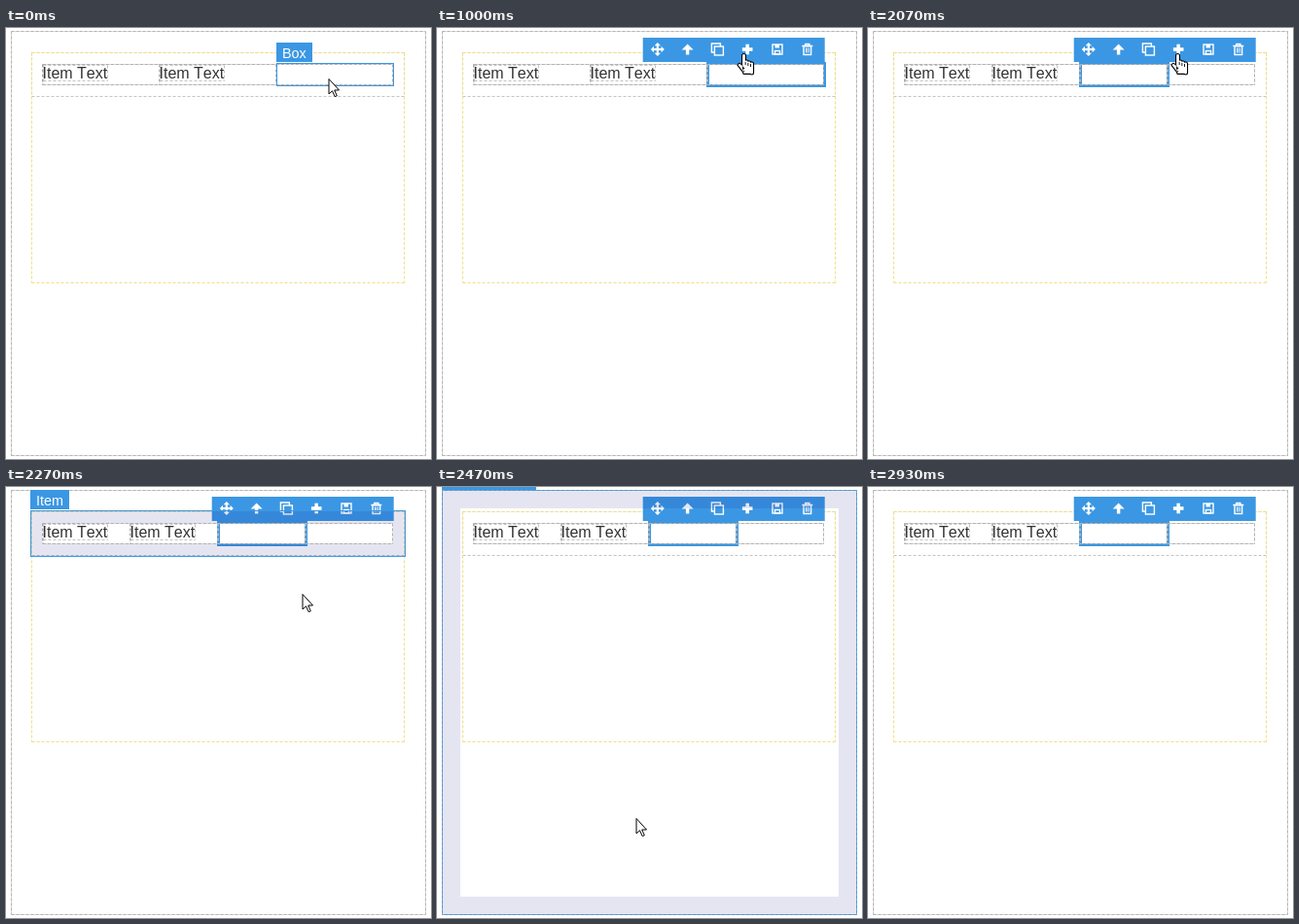
Animation of 437x444 px, one loop 3740 ms. Source, as an HTML page with a canvas:

```html
<!DOCTYPE html>
<html lang="en">
<head>
<meta charset="utf-8">
<title>Adding a box</title>
<style>
html, body { margin: 0; width: 100%; height: 100%; overflow: hidden; background: #fff; }
canvas { display: block; }
</style>
</head>
<body>
<canvas id="stage" width="437" height="444"></canvas>
<script>
const ctx = document.getElementById('stage').getContext('2d');
const LOOP = 3740;
const STEP = 1000 / 15;
const LEAVE = 2930;
const BLUE = '#3b97e3';
const FONT = '"Liberation Sans", Arial, sans-serif';

const linear = u => u;
const easeIn = u => u * u;
const easeOut = u => 1 - (1 - u) ** 2;

const path = [
  { t: 533, x: 332, y: 52 },
  { t: 600, x: 332, y: 44 },
  { t: 1000, x: 315, y: 26 },
  { t: 1130, x: 315, y: 24 },
  { t: 1200, x: 319, y: 20 },
  { t: 2000, x: 319, y: 20 },
  { t: 2267, x: 305, y: 110, ease: easeIn },
  { t: 2467, x: 205, y: 341 },
  { t: LEAVE, x: 128, y: 444, ease: easeOut }
];

function pointerAt(time) {
  const t = Math.floor((time + 4) / STEP) * STEP;
  const i = path.findIndex(p => p.t > t);
  if (i === 0) return path[0];
  const a = path[i - 1] || path.at(-1), b = path[i] || a;
  const u = (b.ease || linear)((t - a.t) / (b.t - a.t || 1));
  return { x: Math.round(a.x + (b.x - a.x) * u), y: Math.round(a.y + (b.y - a.y) * u) };
}

function rect(color, x, y, w, h) {
  ctx.fillStyle = color;
  ctx.fillRect(x, y, w, h);
}

function outline(color, x, y, w, h, width = 1) {
  ctx.strokeStyle = color;
  ctx.lineWidth = width;
  ctx.strokeRect(x + 0.5, y + 0.5, w, h);
}

function trace(...points) {
  ctx.beginPath();
  for (const [x, y] of points) ctx.lineTo(x, y);
}

function dashes(color, x, y, w, h) {
  const l = x + 0.5, t = y + 0.5, r = l + w, b = t + h;
  ctx.strokeStyle = color;
  ctx.lineWidth = 1;
  ctx.setLineDash([3, 2]);
  for (const side of [[[l, t], [r, t]], [[l, b], [r, b]], [[l, t], [l, b]], [[r, t], [r, b]]]) {
    trace(...side);
    ctx.stroke();
  }
  ctx.setLineDash([]);
}

function text(str, x, y, size, color) {
  ctx.font = `${size}px ${FONT}`;
  ctx.fontKerning = 'none';
  ctx.fillStyle = color;
  ctx.fillText(str, x, y);
}

function badge(str, x, y, w) {
  rect(BLUE, x, y, w, 20);
  text(str, x + 6, y + 16, 14.4, '#fff');
}

// tinted ring between a rectangle and its inset
function padding(x, y, w, h, inset) {
  ctx.beginPath();
  ctx.rect(x, y, w, h);
  ctx.rect(x + inset, y + inset, w - 2 * inset, h - 2 * inset);
  ctx.fillStyle = 'rgba(0, 0, 128, 0.1)';
  ctx.fill('evenodd');
}

function arrowHead(tip, half) {
  trace([0, tip], [half, tip + half], [-half, tip + half]);
  ctx.fill();
}

// each icon is drawn around its own centre
const icons = [
  function move() {
    for (let i = 0; i < 4; i++) {
      arrowHead(-7, 3.2);
      ctx.fillRect(-1.1, -5, 2.2, 5);
      ctx.rotate(Math.PI / 2);
    }
  },
  function up() {
    arrowHead(-5.5, 6);
    ctx.fillRect(-1.7, -1, 3.4, 6.5);
  },
  function copy() {
    ctx.strokeRect(-3, -3, 9, 9);
    trace([-3, 3], [-6, 3], [-6, -6], [3, -6], [3, -3]);
    ctx.stroke();
  },
  function plus() {
    ctx.fillRect(-5.3, -1.8, 10.6, 3.6);
    ctx.fillRect(-1.8, -5.3, 3.6, 10.6);
  },
  function save() {
    ctx.strokeRect(-5, -5, 10, 10);
    ctx.strokeRect(-2.5, 1.5, 5, 3.5);
    ctx.fillRect(-2.5, -5, 4.5, 3.5);
  },
  function trash() {
    ctx.fillRect(-5.5, -4.2, 11, 1.4);
    ctx.strokeRect(-2, -5.5, 4, 2);
    ctx.strokeRect(-3.8, -3.5, 7.6, 9);
    for (const x of [-1.5, 0, 1.5]) ctx.fillRect(x - 0.4, -1.5, 0.8, 5);
  }
];

function drawToolbar() {
  rect(BLUE, 211.7, 10, 187, 25);
  icons.forEach((icon, i) => {
    ctx.save();
    ctx.translate(226.8 + 30.8 * i, 22);
    ctx.fillStyle = ctx.strokeStyle = '#fff';
    ctx.lineWidth = 1.4;
    icon();
    ctx.restore();
  });
}

function drawPage() {
  rect('#fff', 0, 0, 437, 444);
  outline('#dedede', 5, 3, 426, 437);
  dashes('#b4b4b4', 5, 3, 426, 437);
  dashes('#c4c4c4', 26, 25, 383, 45);
  dashes('#f0df82', 26, 25, 383, 237);
}

function drawCells(count) {
  const edge = i => Math.round(37.5 + i * 360.8 / count);
  dashes('#a6a6a6', 37, 37, 360, 21);
  for (let i = 0; i < count; i++) {
    dashes('#b4b4b4', edge(i), 37, edge(i + 1) - edge(i) - 1, 21);
    if (i < 2) {
      dashes('#c4c4c4', edge(i), 38, 66, 16);
      text('Item Text', edge(i) - 0.5, 52, 16, '#333');
    }
  }
}

function drawHover(t, onBar) {
  if (t < 1000 && !onBar) {
    outline(BLUE, 278, 36, 120, 23);
    badge('Box', 278, 15, 37);
  } else if (t >= 2200 && t < 2400) {
    padding(25, 25, 385, 46, 12);
    outline(BLUE, 25, 24, 385, 47);
    badge('Item', 25, 3, 40);
  } else if (t >= 2400 && t < LEAVE) {
    padding(6, 4, 425, 436, 18);
    outline(BLUE, 5, 3, 426, 437);
    dashes('rgba(170, 170, 170, 0.6)', 5, 3, 426, 437);
    rect(BLUE, 5, 0, 97, 3);
  }
}

function drawArrow() {
  trace([0.5, 0.5], [0.5, 16], [4, 12.8], [6.7, 18.7], [8.8, 17.8], [6.2, 12], [11, 12]);
  ctx.closePath();
  ctx.fill();
  ctx.stroke();
}

function drawHand() {
  const finger = 2.7;
  ctx.beginPath();
  for (let i = 0; i < 4; i++) {
    ctx.roundRect(i * finger - 1.4, i ? 6.5 + i : 1, 2.8, 12, 1.4);
  }
  ctx.roundRect(-1.4, 11, 10.9, 7, 2);
  ctx.rect(-0.2, 16, 8, 4.8);
  ctx.moveTo(-1.4, 13);
  for (const [x, y] of [[-4.5, 10.8], [-6, 12], [-0.2, 19.5], [2, 17]]) ctx.lineTo(x, y);
  ctx.closePath();
  ctx.lineWidth = 2.2;
  ctx.stroke();
  ctx.fill();
  ctx.fillStyle = '#000';
  for (let i = 1; i < 4; i++) ctx.fillRect(i * finger - 1.5, 8 + i, 0.9, 3);
}

function drawPointer({ x, y }, onBar) {
  ctx.save();
  ctx.translate(onBar ? x + 0.5 : x - 0.5, y);
  ctx.fillStyle = '#fff';
  ctx.strokeStyle = '#000';
  ctx.lineWidth = 1;
  ctx.lineJoin = 'round';
  if (onBar) drawHand();
  else drawArrow();
  ctx.restore();
}

function draw(t) {
  const added = t >= 1600;
  const pointer = pointerAt(t);
  const onBar = pointer.y <= 35;
  drawPage();
  if (t >= 130) outline(BLUE, added ? 218 : 278, 36, added ? 90 : 120, 23, 3);
  drawCells(added ? 4 : 3);
  if (t >= 130) drawToolbar();
  drawHover(t, onBar);
  if (t < LEAVE) drawPointer(pointer, onBar);
}

const start = performance.now();
function tick() {
  draw((performance.now() - start) % LOOP);
  requestAnimationFrame(tick);
}
tick();
</script>
</body>
</html>
```
